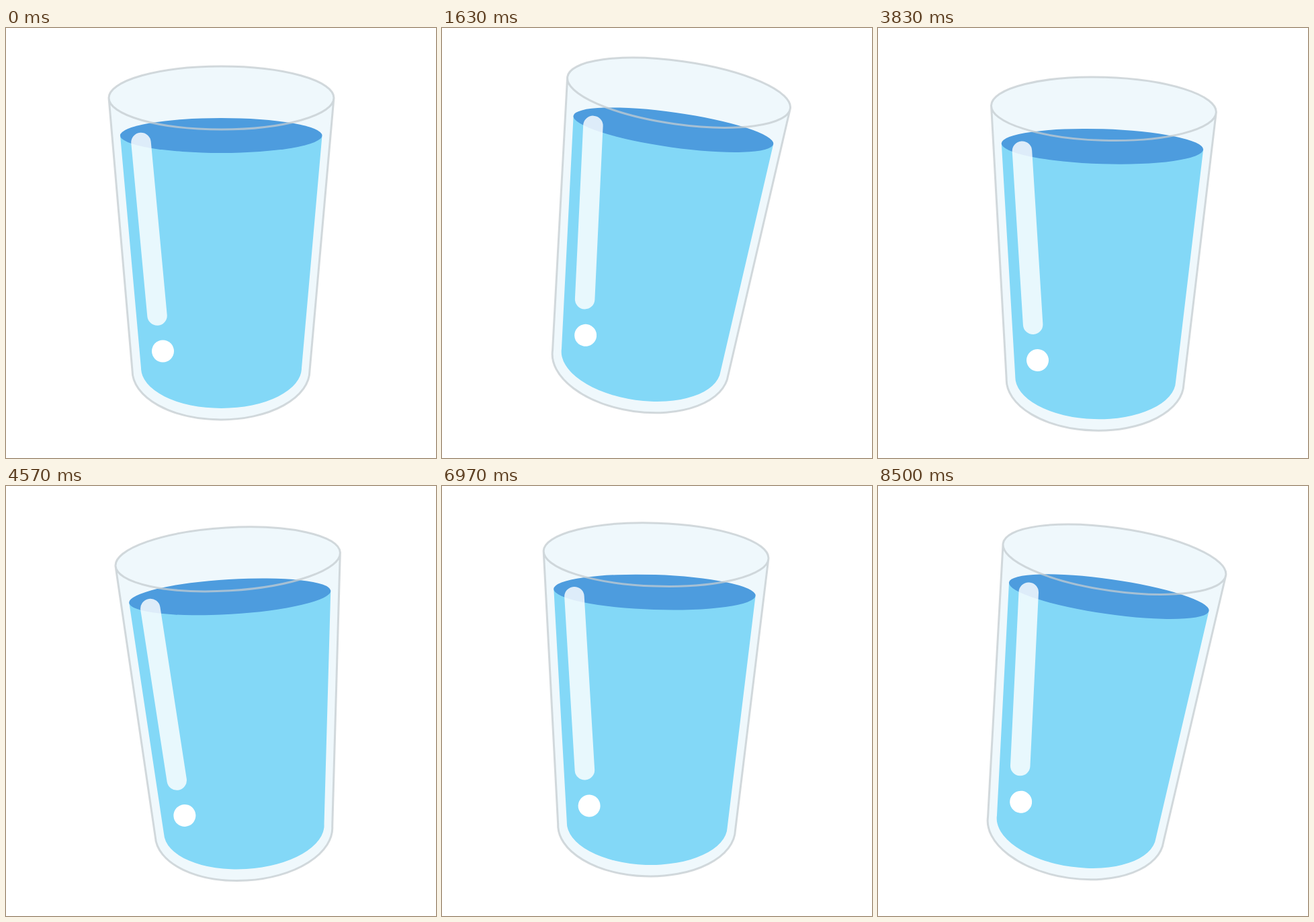
Recreate the animation shown at these times as an HTML page. Size 640x640 px, loop 8.53 s.

```html
<!DOCTYPE html>
<html lang="en">
<head>
<meta charset="utf-8">
<title>Glass of water</title>
<style>
  html, body { margin: 0; width: 100%; height: 100%; overflow: hidden; background: #fff; }
  svg { display: block; width: 100vw; height: 100vh; }
</style>
</head>
<body>
<svg viewBox="0 0 640 640">
  <g id="glass">
    <path fill="#eff8fc" d="M153 104A167.5 47 0 0 1 488 104L452 510A132 73 0 0 1 188 510Z"/>
    <path fill="#83d8f7" d="M170 160H470.500L440 506A119.500 60 0 0 1 201 506Z"/>
    <ellipse fill="#4d9cde" cx="320.2" cy="160" rx="150.300" ry="26"/>
    <path fill="none" stroke="#c5ccd0" stroke-opacity=".75" stroke-width="3" stroke-linejoin="round"
      d="M153 104A167.500 47 0 0 1 488 104A167.500 47 0 0 1 153 104L188 510A132 73 0 0 0 452 510L488 104"/>
    <path stroke="#fff" stroke-opacity=".81" stroke-width="29.500" stroke-linecap="round" d="M201 170.500L225 428"/>
    <circle fill="#fff" cx="233.500" cy="481" r="16.500"/>
  </g>
</svg>
<script>
const LOOP = 8530, FRAMES = 256;

// time in ms, shift x, shift y, tilt in degrees
const poses = [
  [0, 0, 0, 0], [300, 23, 14, 9], [600, 9, 21, -5],
  [880, 4, 2, 0], [1150, 0, 5, -3], [1400, 22, -14, 8.5],
  [1630, 2, -10, 8.05], [1750, -5, -8, 4], [2000, -12, -2, 0],
  [2300, 8, 5, 2], [2600, 6, -2, -1], [2850, 16, -17, 4],
  [3070, 5, 10.5, 3.45], [3280, 14, 22, 3], [3480, 9, 0, -0.5],
  [3720, 18, 24, 6.2], [4000, -8, -5, -6.5], [4270, 3, -26, -1],
  [4570, 22.6, 5, -3.43], [4800, 22, 20, 9], [5080, -6, -20, -7],
  [5220, 0, -10, -5.5], [5480, 10, -12, 5], [5830, -8.3, -3.6, -3.6],
  [6080, -6, -9, -2], [6350, -14, -13, -0.5], [6650, -4, 0, 0.5],
  [6970, -9.2, -2, 1.9], [7250, -16, 19, -1.5], [7550, -12, -21, 4],
  [7800, -10, 5, 2], [8050, -12, 19, -4], [8500, 1, 3, 8.1]
];

const slope = (i, k) =>
  (poses[i + 1][k] - poses[i][k]) / (poses[i + 1][0] - poses[i][0]);

// Tangents that never overshoot a pose
function tangent(i, k) {
  if (i === 0 || i === poses.length - 1) return 0;
  const a = slope(i - 1, k), b = slope(i, k);
  return a * b > 0 ? 2 * a * b / (a + b) : 0;
}

function valueAt(t, k) {
  const last = poses.length - 1;
  if (t >= poses[last][0]) return poses[last][k];
  const i = poses.findIndex(p => p[0] > t) - 1;
  const span = poses[i + 1][0] - poses[i][0];
  const u = (t - poses[i][0]) / span, v = 1 - u;
  return poses[i][k] * (1 + 2 * u) * v * v
    + poses[i + 1][k] * u * u * (3 - 2 * u)
    + span * u * v * (tangent(i, k) * v - tangent(i + 1, k) * u);
}

const glass = document.getElementById("glass");
const start = performance.now();

function draw() {
  const step = LOOP / FRAMES;
  const time = Math.max(0, performance.now() - start) % LOOP;
  const t = Math.floor((time + 4) / step) % FRAMES * step;
  const [x, y, tilt] = [1, 2, 3].map(k => valueAt(t, k).toFixed(2));
  glass.setAttribute("transform", `translate(${x} ${y}) rotate(${tilt} 320 320)`);
  requestAnimationFrame(draw);
}
draw();
</script>
</body>
</html>
```
